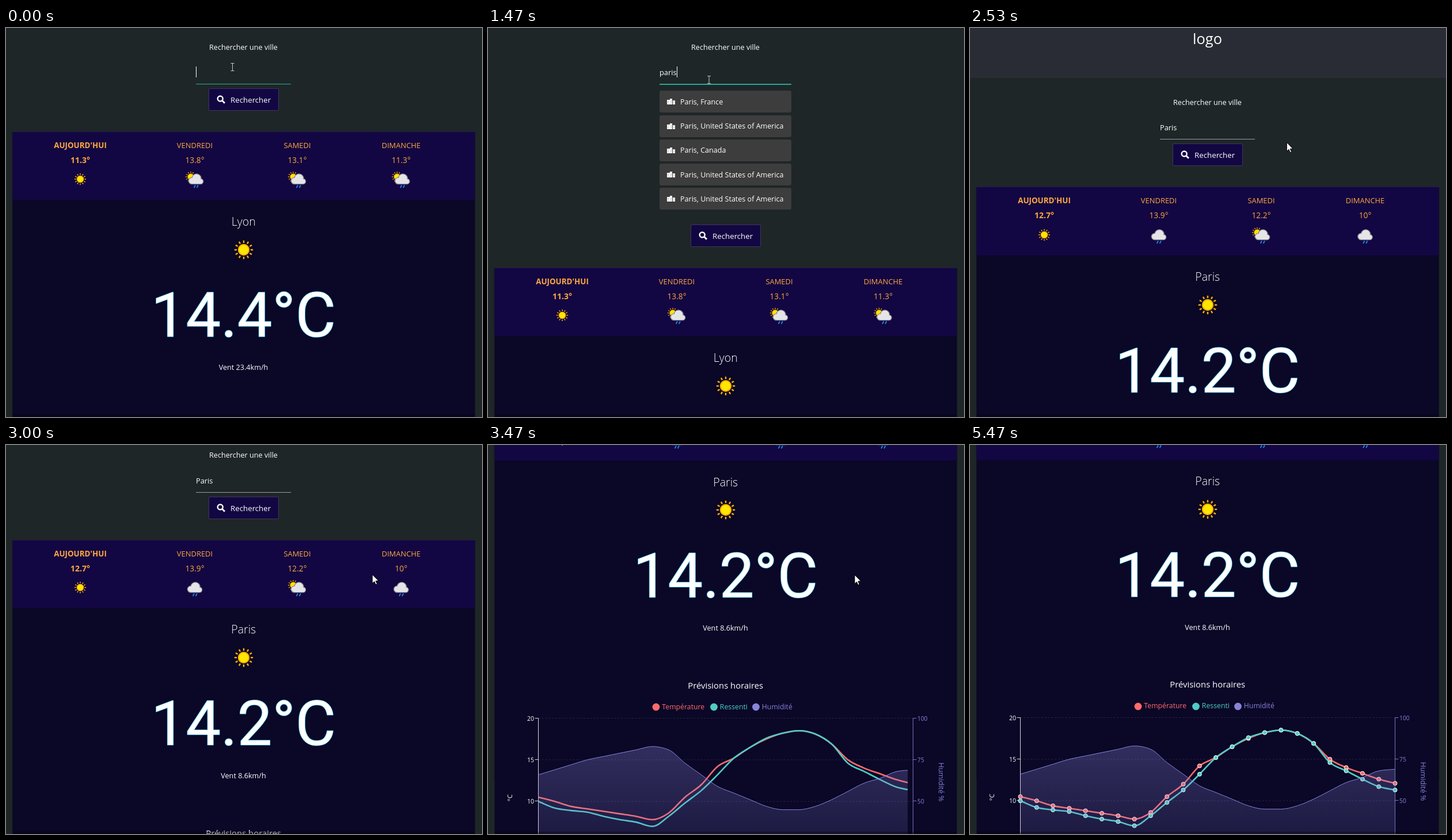
Animation of 827 by 677 pixels, one loop 6.27 s. Source, as an HTML page with a canvas:

```html
<!DOCTYPE html>
<html lang="fr">
<head>
<meta charset="utf-8">
<title>Météo</title>
<style>
html, body { margin: 0; width: 100%; height: 100%; overflow: hidden; background: #1f2627; }
canvas { display: block; width: 827px; height: 677px; }
</style>
</head>
<body>
<canvas id="stage" width="827" height="677"></canvas>
<script>
const W = 827, H = 677, LOOP = 6270;
const ctx = document.getElementById('stage').getContext('2d');
const SANS = '"Open Sans", "Noto Sans", sans-serif';
const NAVY = '#120742', ORANGE = '#ffa640', TEAL = '#26a69a';
const RED = '#ff6b6b', MINT = '#4ecdc4', VIOLET = '#8884d8';

const SUN = 'sun', MIX = 'mix', RAIN = 'rain';
const lyon = { name: 'Lyon', temp: '14.4', wind: '23.4',
  days: [['11.3', SUN], ['13.8', MIX], ['13.1', MIX], ['11.3', MIX]] };
const paris = { name: 'Paris', temp: '14.2', wind: '8.6',
  days: [['12.7', SUN], ['13.9', RAIN], ['12.2', MIX], ['10', RAIN]] };
const dayNames = ["AUJOURD'HUI", 'VENDREDI', 'SAMEDI', 'DIMANCHE'];
const dayX = [129, 328, 506, 686.5];

// Hourly data
const temps = [10.5, 10, 9.4, 9.1, 8.8, 8.5, 8.2, 7.8, 8.6, 10.5, 12, 14.2,
  15.2, 16.5, 17.5, 18.2, 18.5, 18.1, 16.9, 15, 14, 13.3, 12.6, 12.1];
const feels = [10, 9.2, 8.9, 8.7, 8.2, 7.8, 7.5, 7, 8.2, 9.8, 11.3, 13.2,
  15.2, 16.5, 17.6, 18.2, 18.5, 18.1, 16.9, 14.6, 13.6, 12.6, 11.7, 11.3];
const humid = [66, 69, 72, 75, 77, 79, 81, 83, 81, 73, 66, 59,
  55, 51, 47, 45, 45, 47, 51, 56, 61, 64, 68, 69];

// Timeline: [time, value...]
const typed = [[0, ''], [400, 'p'], [530, 'pa'], [670, 'par'], [870, 'pari'], [1130, 'paris'], [1730, 'Paris']];
const counts = [[0, 0], [800, 1], [1000, 5], [1730, 0]];
const scrolls = [[0, 96.5], [2000, 96.5], [2001, 0], [2860, 0], [2930, 45], [3000, 111], [3130, 205],
  [3270, 295], [3400, 355], [3470, 368.5], [3540, 370]];
const mouse = [[1470, 384, 90], [1670, 388, 125], [2400, 388, 125], [2530, 550, 199], [2800, 636, 225],
  [3300, 637, 226], [3670, 637, 226], [4000, 330, 450], [4270, 37, 600], [4400, 92, 725],
  [4530, 118, 725], [4590, 118, 790], [4770, 118, 790], [4800, 118, 740], [5400, 172, 725],
  [5440, 172, 725], [5480, 172, 790]];

const stepAt = (keys, t) => keys.filter(k => k[0] <= t).pop()[1];

function tween(keys, t) {
  const i = keys.findIndex(k => k[0] > t);
  if (i === 0) return keys[0].slice(1);
  if (i < 0) return keys[keys.length - 1].slice(1);
  const a = keys[i - 1], b = keys[i], p = (t - a[0]) / (b[0] - a[0]);
  return a.slice(1).map((v, j) => v + (b[j + 1] - v) * p);
}

// Standard "ease" curve
function ease(x) {
  if (x <= 0) return 0;
  if (x >= 1) return 1;
  let lo = 0, hi = 1, u = x;
  const bez = (a, b) => 3 * (1 - u) * (1 - u) * u * a + 3 * (1 - u) * u * u * b + u * u * u;
  for (let i = 0; i < 24; i++) {
    u = (lo + hi) / 2;
    if (bez(0.25, 0.25) < x) lo = u; else hi = u;
  }
  return bez(0.1, 1);
}

// y is the middle of the capital letters
function text(str, x, y, size, color = '#fff', align = 'center', weight = 400, family = SANS) {
  ctx.font = `${weight} ${size}px ${family}`;
  ctx.textAlign = align;
  ctx.fillStyle = color;
  ctx.fillText(str, x, Math.round(y + size * 0.357));
}

function box(x, y, w, h, color, r = 0) {
  ctx.fillStyle = color;
  ctx.beginPath();
  ctx.roundRect(x, Math.round(y), w, Math.round(h), r);
  ctx.fill();
}

function line(x1, y1, x2, y2, color, width = 1) {
  ctx.strokeStyle = color;
  ctx.lineWidth = width;
  ctx.beginPath();
  ctx.moveTo(x1, y1);
  ctx.lineTo(x2, y2);
  ctx.stroke();
}

function disc(x, y, r, fill, stroke, width = 1) {
  ctx.beginPath();
  ctx.arc(x, y, r, 0, Math.PI * 2);
  if (fill) { ctx.fillStyle = fill; ctx.fill(); }
  if (stroke) { ctx.strokeStyle = stroke; ctx.lineWidth = width; ctx.stroke(); }
}

function sun(x, y, k) {
  for (let i = 0; i < 12; i++) {
    const a = i * Math.PI / 6, c = Math.cos(a), s = Math.sin(a);
    line(x + c * 12 * k, y + s * 12 * k, x + c * 16.2 * k, y + s * 16.2 * k, '#ffb000', 2.4 * k);
  }
  disc(x, y, 9.2 * k, '#ffe600', '#ffab00', 2 * k);
}

function cloud(x, y) {
  const shape = () => {
    ctx.beginPath();
    for (const [cx, cy, r] of [[-7, 3, 5], [1, -1, 7.4], [8, 4, 4]]) {
      ctx.moveTo(x + cx + r, y + cy);
      ctx.arc(x + cx, y + cy, r, 0, Math.PI * 2);
    }
    ctx.rect(x - 7, y + 2, 15, 6);
  };
  shape();
  ctx.strokeStyle = '#8b8b91';
  ctx.lineWidth = 2.6;
  ctx.stroke();
  ctx.fillStyle = '#e5e5e8';
  ctx.fill();
  for (const dx of [-1, 4]) line(x + dx, y + 10.5, x + dx - 2.4, y + 15, '#1e90ff', 1.6);
}

function weatherIcon(kind, x, y) {
  if (kind === SUN) return sun(x, y, 0.62);
  if (kind === MIX) sun(x - 7, y - 4, 0.56);
  cloud(x + (kind === MIX ? 2 : 0), y);
}

function cityIcon(x, y) {
  box(x, y - 3, 5, 8, '#fff');
  box(x + 5, y - 5, 4, 10, '#fff');
  box(x + 10, y - 2, 4, 7, '#fff');
  for (const dx of [1.5, 6.5, 11.5])
    for (const dy of [-1, 2]) box(x + dx, y + dy, 1, 1, '#3d3d3d');
}

function search(t, s, shift, n, cx) {
  text('Rechercher une ville', cx, 129.5 - s, 12.65);
  const w = n === 5 ? 229 : 165, x = Math.round(cx - w / 2);
  const value = stepAt(typed, t), focus = t < 1730;
  text(value, x, 173.7 - s, 12.8, '#fff', 'left');
  const y = Math.round(193.4 - s);
  box(x, y, w, 1, focus ? TEAL : '#9e9e9e');
  if (focus) {
    ctx.globalAlpha = Math.min(1, 0.1 + t / 220);
    box(x, y + 1, w, 1, TEAL);
    ctx.globalAlpha = 1;
    box(x + Math.round(ctx.measureText(value).width), 163.5 - s, 1, 19, '#fff');
  }
  for (let i = 0; i < n; i++) {
    const top = 205.7 - s + i * 42.3;
    box(x, top, w, 38, '#3d3d3d', 3);
    cityIcon(x + 13, top + 19);
    const other = i === 3 && t < 1130 ? 'Parika, Guyana' : 'Paris, United States of America';
    text(i === 0 ? 'Paris, France' : i === 2 ? 'Paris, Canada' : other, x + 36, top + 19, 12.55, '#fff', 'left');
  }
  const by = Math.round(201.3 - s + shift), bx = Math.round(cx - 61);
  box(bx, by, 122, 39, '#3c365f', 2);
  box(bx + 1, by + 1, 120, 37, NAVY, 1);
  disc(bx + 20.2, by + 18, 4.5, null, '#fff', 2.4);
  line(bx + 23.5, by + 21.3, bx + 28, by + 25.8, '#fff', 2.8);
  text('Rechercher', bx + 38, by + 20, 13.3, '#fff', 'left');
}

function panel(city, s) {
  const top = Math.round(276.4 - s), mid = Math.round(395.6 - s);
  box(10, top, 806, H, 'rgba(0,0,0,.15)');
  box(11.5, top, 803, H + 400, '#0a0727', 2);
  box(11.5, top, 803, mid - top, NAVY, 2);
  box(11.5, top, 803, 1, '#231a51');
  dayNames.forEach((name, i) => {
    const bold = i ? 400 : 700, [temp, kind] = city.days[i];
    text(name, dayX[i], 300.7 - s, i ? 12.95 : 13.4, ORANGE, 'center', bold);
    text(temp + '°', dayX[i], 326.4 - s, i ? 13.7 : 14, ORANGE, 'center', bold);
    weatherIcon(kind, dayX[i], Math.round(359.8 - s));
  });
  text(city.name, 412.7, 433.2 - s, 19.6, '#fff', 'center', 300);
  sun(413, Math.round(482 - s), 1);
  const big = city.temp + '°C', size = 108, y = Math.round(595 - s + size * 0.357);
  ctx.font = `400 ${size}px Roboto, sans-serif`;
  ctx.textAlign = 'center';
  ctx.lineJoin = 'round';
  ctx.strokeStyle = '#35b6e0';
  ctx.lineWidth = 1.6;
  ctx.strokeText(big, 412.5, y);
  ctx.fillStyle = '#fff';
  ctx.fillText(big, 412.5, y);
  text(`Vent ${city.wind}km/h`, 412.5, 687.3 - s, 12.65);
}

const X0 = 87.5, X1 = 738.5, STEP = (X1 - X0) / 23, DEG = 14.47, CHART_H = 20 * DEG;

// Monotone cubic through evenly spaced points
function curve(ys) {
  const d = ys.slice(1).map((y, i) => (y - ys[i]) / STEP);
  const m = ys.map((_, i) => {
    if (i === 0) return d[0];
    if (i === d.length) return d[i - 1];
    const a = d[i - 1], b = d[i];
    return a * b <= 0 ? 0 : Math.sign(a) * Math.min(2 * Math.abs(a), 2 * Math.abs(b), Math.abs(a + b) / 2);
  });
  ctx.beginPath();
  ctx.moveTo(X0, ys[0]);
  for (let i = 1; i < ys.length; i++) {
    const x = X0 + i * STEP, h = STEP / 3;
    ctx.bezierCurveTo(x - STEP + h, ys[i - 1] + m[i - 1] * h, x - h, ys[i] - m[i] * h, x, ys[i]);
  }
}

function axes(top) {
  ctx.setLineDash([3, 3]);
  for (let i = 0; i < 5; i++) line(X0, top + i * 5 * DEG, X1, top + i * 5 * DEG, '#2a2742');
  ctx.setLineDash([]);
  line(X0, top, X0, top + CHART_H, '#d8d8dc');
  line(X1, top, X1, top + CHART_H, '#7773bd');
  for (let i = 0; i < 5; i++) {
    const y = Math.round(top + i * 5 * DEG) - 0.5;
    line(X0 - 6, y, X0, y, '#d8d8dc');
    line(X1, y, X1 + 6, y, '#7773bd');
    text(20 - i * 5, 80, y + 0.5, 10.6, '#fff', 'right');
    text(100 - i * 25, 746, y + 0.5, 10.3, VIOLET, 'left');
  }
  const turned = (str, x, y, angle, size, color) => {
    ctx.save();
    ctx.translate(x, y);
    ctx.rotate(angle);
    text(str, 0, 0, size, color);
    ctx.restore();
  };
  turned('°C', 38, top + 138.5, -Math.PI / 2, 11.6, '#fff');
  turned('Humidité %', 787, top + 111, Math.PI / 2, 12.6, VIOLET);
}

function tooltip(i, top, my, series) {
  const x = X0 + i * STEP;
  line(x, top, x, top + CHART_H, '#ccc');
  const rows = [[`Température : ${temps[i]}`, RED], [`Ressenti : ${feels[i]}`, MINT], [`Humidité : ${humid[i]}`, VIOLET]];
  series.forEach(([ys, color]) => disc(x, ys[i], 4, color, '#fff', 2));
  ctx.font = `400 12.4px ${SANS}`;
  const w = Math.round(ctx.measureText(rows[0][0]).width) + 22, h = 122;
  const y = my + 10 + h > top + CHART_H ? my - h - 10 : my + 10;
  box(x + 10, y, w, h, '#ccc');
  box(x + 11, Math.round(y) + 1, w - 2, h - 2, '#fff');
  text(`${i}h`, x + 21, y + 21, 12.4, '#222', 'left');
  rows.forEach(([str, color], r) => text(str, x + 21, y + 47 + r * 26, 12.4, color, 'left'));
}

function chart(t, s, mx, my) {
  const top = Math.round(845 - s) - 0.5;
  text('Prévisions horaires', 412.7, 787 - s, 14.85);
  [[292, 'Température', RED], [392.5, 'Ressenti', MINT], [465.5, 'Humidité', VIOLET]].forEach(([x, name, color]) => {
    disc(x, Math.round(825 - s), 6.4, color);
    text(name, x + 10.3, 824 - s, 12.3, color, 'left');
  });
  axes(top);

  const tY = temps.map(v => top + (20 - v) * DEG);
  const fY = feels.map(v => top + (20 - v) * DEG);
  const hY = humid.map(v => top + (100 - v) * DEG / 5);
  const p = ease((t - 2205) / 1500);
  ctx.save();
  ctx.beginPath();
  ctx.rect(X0 - 5, top - 5, (X1 - X0) * p + (p < 1 ? 5 : 10), CHART_H + 10);
  ctx.clip();
  for (const [ys, color] of [[tY, RED], [fY, MINT]]) {
    curve(ys);
    ctx.strokeStyle = color;
    ctx.lineWidth = 2.6;
    ctx.stroke();
    if (p === 1) ys.forEach((y, i) => disc(X0 + i * STEP, y, 3.5, color, '#fff', 1));
  }
  curve(hY);
  ctx.strokeStyle = VIOLET;
  ctx.lineWidth = 1;
  ctx.stroke();
  ctx.lineTo(X1, top + CHART_H);
  ctx.lineTo(X0, top + CHART_H);
  const g = ctx.createLinearGradient(0, top + 49, 0, top + CHART_H);
  g.addColorStop(0, 'rgba(136,132,216,.31)');
  g.addColorStop(1, 'rgba(136,132,216,.06)');
  ctx.fillStyle = g;
  ctx.fill();
  ctx.restore();

  const over = mx >= X0 && mx <= X1 && my >= top && my <= top + CHART_H;
  if (t > 3700 && over) tooltip(Math.round((mx - X0) / STEP), top, my, [[tY, RED], [fY, MINT], [hY, VIOLET]]);
}

function iBeam(x, y) {
  const c = '#c9cccc';
  line(x, y - 6, x, y + 6, c);
  line(x - 3, y - 6.5, x + 3, y - 6.5, c);
  line(x - 3, y + 6.5, x + 3, y + 6.5, c);
}

function outline(x, y, points) {
  ctx.beginPath();
  points.forEach(([px, py]) => ctx.lineTo(x + px, y + py));
  ctx.closePath();
  ctx.lineJoin = 'miter';
  ctx.fillStyle = '#fff';
  ctx.fill();
  ctx.strokeStyle = '#000';
  ctx.lineWidth = 1;
  ctx.stroke();
}

const arrow = [[0, 0], [0, 15.5], [3.6, 12.2], [6, 17.6], [8.4, 16.6], [6, 11.2], [10.8, 11]];
const hand = [[-1.5, 0], [1.5, 0], [1.5, 6], [9, 8], [9, 13], [7, 19], [-2, 19], [-6, 12], [-5, 10], [-1.5, 12]];

function cursor(t, x, y) {
  if (t < 400) iBeam(393.5, 68);
  else if (t < 1470) return;
  else if (t < 1590) iBeam(x, y);
  else if (t < 2000) outline(x, y, hand);
  else outline(x, y, arrow);
}

function draw(t) {
  const s = tween(scrolls, t)[0], [mx, my] = tween(mouse, t);
  const n = stepAt(counts, t), shift = n ? 25.5 + n * 42.3 : 0;
  const loading = t >= 2000 && t < 2130;
  const cx = loading ? 417.5 : 412.5;
  ctx.fillStyle = '#1f2627';
  ctx.fillRect(0, 0, W, H);
  box(0, -s, W, 87, '#2a2c35');
  text('logo', cx, 19.3 - s, 25.4);
  search(t, s, shift, n, cx);
  if (loading) {
    box(11.5, 276, 813, 119, NAVY, 2);
  } else {
    panel(t < 2000 ? lyon : paris, s - shift);
    if (t >= 2130) chart(t, s, mx, my);
    box(11.5, 673, 803, 4, 'rgba(0,0,0,.3)');
  }
  cursor(t, mx, my);
}

function frame() {
  draw(performance.now() % LOOP);
  requestAnimationFrame(frame);
}
frame();
</script>
</body>
</html>
```
